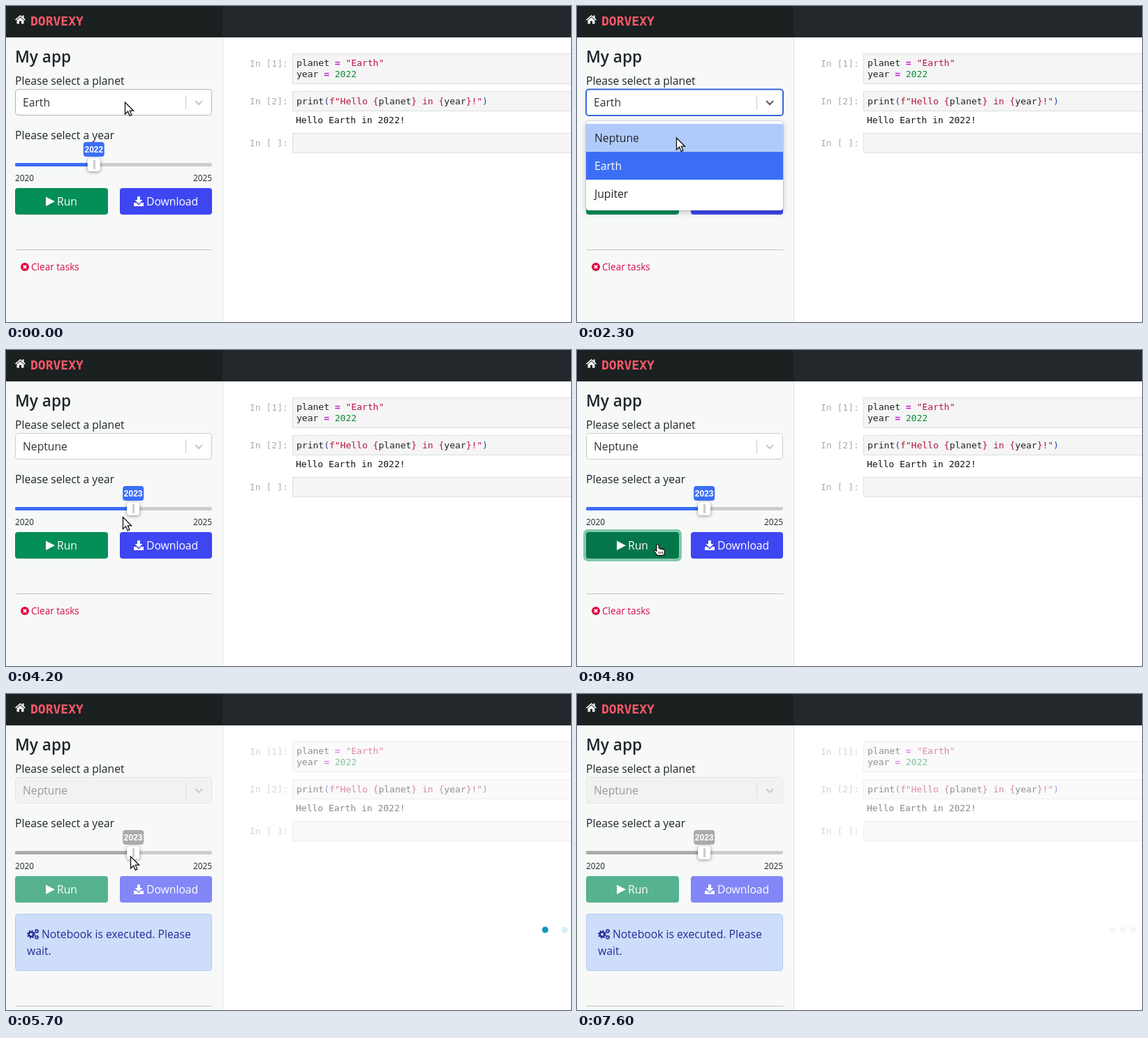
An HTML page with a canvas for the animation above (8 s loop, 809 by 453 pixels).

```html
<!DOCTYPE html>
<html lang="en">
<head>
<meta charset="utf-8">
<title>Notebook app</title>
<style>
html, body { margin: 0; width: 100%; height: 100%; overflow: hidden; background: #fff; }
canvas { display: block; }
</style>
</head>
<body>
<canvas id="stage" width="809" height="453"></canvas>
<script>
const ctx = document.getElementById('stage').getContext('2d');
const LOOP = 8000, STEP = 100;
const OPEN = 1400, PICK = 2400, BLUR = 3400, SLIDE = 3700, HOVER = 4500, CLICK = 4700, BUSY = 4900;
const BLUE = '#3c6ef5', INK = '#212529';
const PLANETS = ['Neptune', 'Earth', 'Jupiter'];

const ui = (size, weight = 400) => `${weight} ${size}px "Open Sans", "Noto Sans", sans-serif`;
const mono = (size, weight = 400) => `${weight} ${size}px "DejaVu Sans Mono", monospace`;
const BODY = ui(15.7), CODE = mono(13);

// Pointer hot spot: time, x, y
const POINTER = [
  [0, 170, 138], [1700, 170, 138], [1900, 152, 182], [2000, 152, 182], [2200, 142, 189],
  [2700, 142, 189], [3000, 124, 230], [3400, 124, 230], [3900, 180, 230], [4100, 180, 230],
  [4600, 115, 278], [5300, 115, 278], [5700, 178, 233], [6200, 812, 300]
];
const ARROW = new Path2D('M0 0V17L4 13.2 6.7 19.3 9.4 18.1 6.8 12.2H12Z');
const HAND = new Path2D('M-1.7 1.6Q0-.8 1.7 1.6V6L7 7Q10 7.6 10 9.6V13L8.5 16.5H-.5L-5 10.6Q-4.6 8.5-3 9L-1.7 10.3Z');
const KNUCKLES = new Path2D('M2 11V14M4.5 11V14M7 11V14M4.5 6.8V9M7.3 7.3V9.3');
const HOUSE = new Path2D('M13 19.6L20.5 13 23.5 15.6V13.6H25.6V17.4L28 19.6 27 20.8 20.5 15 14 20.8ZM15.5 20.6L20.5 16.2 25.5 20.6V25.5H22V21.5H19V25.5H15.5Z');
const TRAY = new Path2D('M188 273H192V278H195.5L190 283.6 184.5 278H188ZM183 282H186.5L190 285.4 193.5 282H197V287H183Z');
const PLAY = new Path2D('M57 273.5L70 280.3 57 287Z');
const CHEVRON = new Path2D('M271 136L276 141 281 136');
const CROSS = new Path2D('M24.8 371.8L29.2 376.2M29.2 371.8L24.8 376.2');

const clamp = v => Math.max(0, Math.min(1, v));

function text(s, x, y, font, color, align = 'left') {
  ctx.font = font;
  ctx.fillStyle = color;
  ctx.textAlign = align;
  ctx.fillText(s, x, y);
}

function rect(x, y, w, h, color) {
  ctx.fillStyle = color;
  ctx.fillRect(x, y, w, h);
}

function box(x, y, w, h, r, fill, stroke, line = 1) {
  ctx.beginPath();
  ctx.roundRect(x, y, w, h, r);
  if (fill) { ctx.fillStyle = fill; ctx.fill(); }
  if (stroke) { ctx.strokeStyle = stroke; ctx.lineWidth = line; ctx.stroke(); }
}

function fill(path, color) {
  ctx.fillStyle = color;
  ctx.fill(path);
}

function stroke(path, color, width) {
  ctx.strokeStyle = color;
  ctx.lineWidth = width;
  ctx.stroke(path);
}

function disc(x, y, r, color) {
  ctx.beginPath();
  ctx.arc(x, y, r, 0, 7);
  ctx.fillStyle = color;
  ctx.fill();
}

function withShadow(color, blur, dy, draw) {
  ctx.save();
  ctx.shadowColor = color;
  ctx.shadowBlur = blur;
  ctx.shadowOffsetY = dy;
  draw();
  ctx.restore();
}

function gear(x, y, r, color) {
  ctx.strokeStyle = color;
  for (const [radius, width, dash] of [[r * .65, r * .5, []], [r, r * .4, [r * .4, r * .385]]]) {
    ctx.beginPath();
    ctx.setLineDash(dash);
    ctx.lineWidth = width;
    ctx.arc(x, y, radius, 0, Math.PI * 2);
    ctx.stroke();
  }
  ctx.setLineDash([]);
}

// Runs of [text, colour, weight] set one after another
function code(y, ...runs) {
  let x = 416;
  for (const [s, color = '#222', weight] of runs) {
    text(s, x, y, mono(13, weight), color);
    x += ctx.measureText(s).width;
  }
}

function notebook(t) {
  const red = '#b5153f', op = '#bd18cf', paren = '#2446a8';
  for (const [y, h] of [[68, 43], [122, 28], [182, 28]])
    box(410.5, y + .5, 420, h, 0, '#f5f5f5', '#dedede');
  [['1', 87], ['2', 141], [' ', 201]].forEach(([n, y]) => text(`In [${n}]:`, 349, y, CODE, '#acacac'));
  code(86, ['planet '], ['=', op, 700], [' '], ['"Earth"', red]);
  code(102, ['year '], ['=', op, 700], [' '], ['2022', '#0b8a3a']);
  code(141, ['print'], ['(', paren], ['f"Hello {', red], ['planet'], ['} in {', red], ['year'], ['}!"', red], [')', paren]);
  text('Hello Earth in 2022!', 415, 168, CODE, '#111');
  if (t >= BUSY) rect(311, 45, 498, 408, `rgba(255,255,255,${t > BUSY ? .5 : .25})`);
}

function header() {
  rect(0, 0, 809, 45, '#24282d');
  rect(0, 0, 310, 45, '#1b2020');
  fill(HOUSE, '#fff');
  text('DORVEXY', 35, 28, mono(18, 700), '#fb5869');
}

function select(t, busy) {
  const focus = t >= OPEN && t < BLUR;
  const edge = busy ? '#e4e4e4' : t < OPEN ? '#b3b3b3' : '#ccc';
  if (focus) box(13, 119.5, 282, 37.5, 4, '#fff', '#3767dc', 2);
  else box(13.5, 119.5, 281, 37, 4, busy ? '#f2f2f2' : '#fff', edge);
  text(t < PICK ? 'Earth' : PLANETS[0], 24, 144, BODY, busy ? '#999' : '#333');
  rect(257, 128, 1, 20, busy ? '#ddd' : '#ccc');
  stroke(CHEVRON, focus ? '#666' : '#ccc', 2.4);
  if (t >= OPEN && t < 1800) rect(24, 129, 1, 18, '#000');
}

function slider(t, busy) {
  const year = t < SLIDE ? 2022 : 2023;
  const x = 13 + (year - 2020) * 56.4;
  const main = busy ? '#ababab' : BLUE;
  box(13, 225, 282, 5, 2, '#ccc');
  box(13, 225, x - 13, 5, 2, main);
  withShadow('rgba(0,0,0,.45)', 5, 1, () => box(x - 9, 218, 18, 19, 4, '#fff'));
  rect(Math.round(x) - 1, 221, 3, 13, '#ccc');
  box(x - 15, 195, 30, 21, 4, main);
  text(year, x, 210, '700 12px "Liberation Sans", Arial, sans-serif', '#fff', 'center');
  text('2020', 13, 251, ui(11.8), INK);
  text('2025', 295, 251, ui(11.8), INK, 'right');
}

function buttons(t, busy) {
  if (t >= CLICK && !busy) box(9, 257, 141, 46, 7, '#82c9ad');
  box(13, 261, 133, 38, 4, busy ? '#56b28f' : t >= HOVER ? '#05764a' : '#048e58');
  box(163, 261, 132, 38, 4, busy ? '#8286f7' : '#3e46f2');
  fill(PLAY, '#fff');
  fill(TRAY, '#fff');
  text('Run', 73, 286, BODY, '#fff');
  text('Download', 201, 286, BODY, '#fff');
}

function notice() {
  const color = '#212d97';
  box(13.5, 315.5, 281, 81, 4, '#cdddfa', '#b2ccf3');
  gear(36, 344.5, 5, color);
  gear(44, 340, 2.7, color);
  gear(44, 348.8, 2.7, color);
  text('Notebook is executed. Please', 51, 350, BODY, color);
  text('wait.', 30, 374, BODY, color);
}

function menu(t) {
  withShadow('rgba(0,0,0,.22)', 9, 3, () => box(13, 165, 282, 128, 4, '#fff'));
  box(12.5, 164.5, 283, 129, 4, null, 'rgba(0,0,0,.1)');
  rect(13, 169, 282, 40, t >= 2300 ? '#b0cbfb' : '#dae9fc');
  rect(13, 209, 282, 40, BLUE);
  PLANETS.forEach((name, i) => text(name, 25, 195 + i * 40, BODY, i === 1 ? '#fff' : INK));
}

function sidebar(t) {
  const busy = t >= BUSY;
  rect(0, 45, 310, 408, '#f7f9f9');
  rect(310, 45, 1, 408, '#dcdfe1');
  text('My app', 13, 81, ui(22.6, 600), INK);
  text('Please select a planet', 13, 113, BODY, INK);
  text('Please select a year', 13, 191, BODY, INK);
  select(t, busy);
  slider(t, busy);
  buttons(t, busy);
  if (busy) notice();
  rect(13, busy ? 447 : 349, 282, 1, '#c3c5c5');
  if (!busy) {
    disc(27, 374, 6, '#dc0b46');
    stroke(CROSS, '#fff', 1.8);
    text('Clear tasks', 36, 379, ui(13.6), '#dc0b46');
  }
  if (t >= OPEN && t < PICK) menu(t);
}

function loader(t) {
  const fade = clamp((t - 5300) / 400) * clamp((6800 - t) / 1100);
  const drift = (t - 5700) * .02;
  disc(772 + drift, 338, 4.5, `rgba(22,150,185,${fade})`);
  disc(800 + drift, 338, 4.5, `rgba(40,180,225,${fade * .2})`);
  const faint = clamp((t - 7100) / 500) * .045;
  for (const x of [767, 782, 797]) disc(x, 338, 4.5, `rgba(20,40,60,${faint})`);
}

function pointer(t) {
  const i = POINTER.findIndex(k => k[0] > t);
  if (i < 0) return;
  const [t0, x0, y0] = POINTER[i - 1], [t1, x1, y1] = POINTER[i];
  const p = (t - t0) / (t1 - t0);
  const hand = t >= 3000 && t < 4200 || t >= HOVER && t < BUSY;
  const shape = hand ? HAND : ARROW;
  ctx.save();
  ctx.translate(x0 + (x1 - x0) * p + .5, y0 + (y1 - y0) * p);
  fill(shape, '#fff');
  stroke(shape, '#111', 1.3);
  if (hand) stroke(KNUCKLES, '#111', 1);
  ctx.restore();
}

function frame() {
  const t = Math.floor(performance.now() % LOOP / STEP) * STEP;
  rect(0, 0, 809, 453, '#fff');
  notebook(t);
  sidebar(t);
  header();
  loader(t);
  pointer(t);
  requestAnimationFrame(frame);
}
frame();
</script>
</body>
</html>
```
